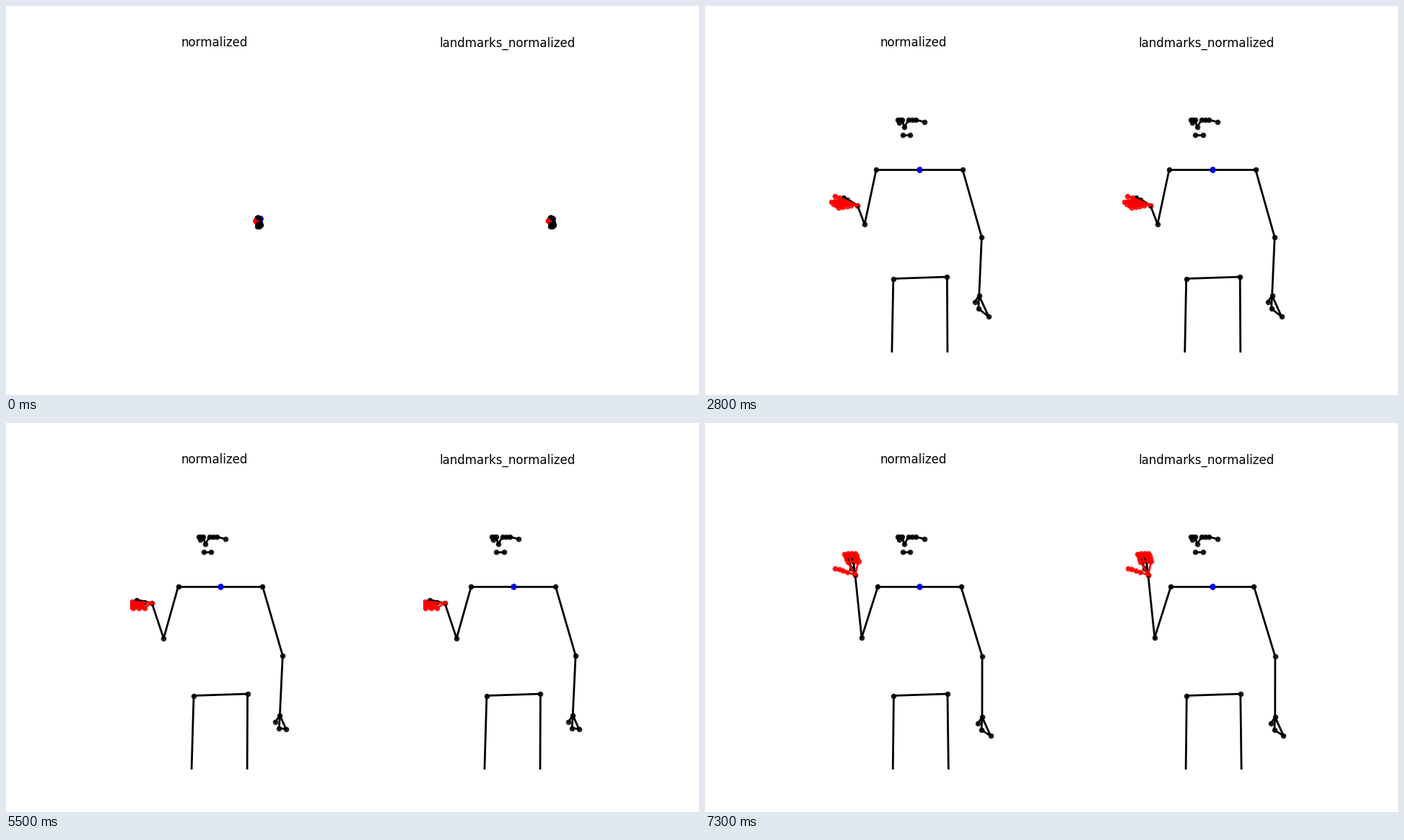
Animation of 960 by 540 pixels, one loop 8000 ms. Source, as a matplotlib script:

```python
import numpy as np
import matplotlib.pyplot as plt
from matplotlib.animation import FuncAnimation
from matplotlib.collections import LineCollection

STEP = 100
FRAMES = 80
CENTER = np.array([297, 227])

# Key values of the moving parts, times in seconds, angles in degrees above left
BEATS = [0.1, 1.0, 1.9, 3.7, 5.5, 6.8, 7.3]
TRACKS = {
    "wrist_x": [214, 218, 216, 206, 202, 206, 208],
    "wrist_y": [352, 312, 285, 268, 250, 220, 211],
    "aim": [-65, 43, 29, 15, 4, 36, 60],
    "curl": [-95, -110, -22, 0, 0, 0, 70],
    "reach": [15, 15, 11, 23, 24, 13, 12],
    "sway": [1, 1, -1.5, 0.5, -2.5, 0.5, 1],
    "splay": [20, 18, 30, 29, 19, 18, 26],
}

# 0-10 face, 11-12 shoulders, 13-14 elbows, 15-16 wrists, 17-19 left and
# 20-22 right pinky/index/thumb, 23-24 hips, 25-26 knees
BODY_LINKS = [(0, 1), (1, 2), (2, 3), (3, 7), (0, 4), (4, 5), (5, 6), (6, 8),
              (9, 10), (11, 12), (11, 13), (13, 15), (12, 14), (14, 16),
              (15, 17), (15, 18), (15, 19), (17, 18),
              (16, 20), (16, 21), (16, 22), (20, 21),
              (23, 24), (23, 25), (24, 26)]
HAND_LINKS = [(0, 1), (0, 5), (5, 9), (9, 13), (13, 17), (0, 17)]
HAND_LINKS += [(4 * f + j, 4 * f + j + 1) for f in range(5) for j in (1, 2, 3)]


def vec(x, y):
    return np.array([x, y], float)


def polar(length, degrees):
    a = np.radians(degrees)
    return -length * vec(np.cos(a), np.sin(a))


def face(t):
    turn = np.clip((1.9 - t) / 0.9, 0, 1)
    nose = vec(276, 168) + turn * vec(3, -1.5)
    left_eye = [(6 + 5 * i, -10) for i in range(3)]
    right_eye = [(-3 - 3 * i, -10) for i in range(3)]
    ears = [(28, -7), (-7, -6)]
    mouth = [(8, 11), (-2.5, 11)]
    return nose + np.array([(0, 0)] + left_eye + right_eye + ears + mouth)


def hand(t, k, wrist):
    opening = np.clip((t - 6.8) / 0.5, 0, 1)
    index = wrist + polar(21, k["aim"])
    palm = vec(10.5, 8) + opening * vec(4.5, -9)
    finger = polar(k["reach"], k["curl"])
    thumb = polar(34, k["aim"]) + opening * vec(-11, 20)
    joints = [wrist[None], np.linspace(wrist + 0.4 * thumb, wrist + thumb, 4)]
    for i in range(4):
        knuckle = index + palm * i / 3
        joints.append(np.linspace(knuckle, knuckle + finger, 4))
    return np.vstack(joints)


def pose(t):
    k = {name: np.interp(t, BEATS, track) for name, track in TRACKS.items()}
    half = vec(61.2 - 0.5 * t, 0)

    wrist = vec(k["wrist_x"], k["wrist_y"])
    elbow = vec(np.interp(t, [0.1, 1.9, 6.8], [211, 222, 217]),
                297.5 + 14 * np.exp((0.9 - t) / 2))
    joints = hand(t, k, wrist)
    index, pinky = joints[5], joints[17]
    right = [(index + pinky) / 2 - vec(0, 4), index - vec(0, 3),
             (wrist + index) / 2]

    left_wrist = vec(378.5 + 0.6 * t + k["sway"], 398 + 1.4 * t)
    left_elbow = vec(320, 120) + left_wrist * vec(1 / 6, 0.5)
    left = [left_wrist + d for d in (vec(0.45, 1) * k["splay"],
                                     vec(-1, 18), vec(-6, 9))]

    sway = vec(k["sway"], 0)
    hips = [vec(335.5, 376) + 0.4 * sway, vec(261, 378.5) + 0.4 * sway]
    knees = [vec(336.5, 500) + sway, vec(259, 500) + sway]

    body = [CENTER + half, CENTER - half, left_elbow, elbow, left_wrist, wrist,
            *left, *right, *hips, *knees]
    return np.vstack([face(t), body]), joints


def held(ms):
    """Time of the pose on screen: slow steps, with one fast stretch."""
    if ms >= 7300:
        return 7300
    if ms >= 6400:
        return ms
    return 100 + (ms - 100) // 900 * 900


def shrink(p):
    return vec(349, 294) + (p - vec(287, 157)) * 0.035


class Part:
    def __init__(self, ax, color, links):
        self.links = np.array(links)
        self.dots = ax.scatter([], [], s=20, color=color, alpha=0.8)
        self.lines = LineCollection([], colors=color, linewidths=2,
                                    capstyle="projecting")
        ax.add_collection(self.lines, autolim=False)

    def place(self, p):
        self.dots.set_offsets(p)
        segments = p[self.links]
        moved = np.ptp(segments, axis=1).any(axis=1)
        self.lines.set_segments(segments[moved])


class Panel:
    def __init__(self, ax, title):
        ax.set_title(title)
        ax.set_box_aspect(16 / 9)
        ax.set_xlim(172.1, 406)
        ax.set_ylim(480.6, 64.8)
        ax.axis("off")
        self.left = Part(ax, "blue", HAND_LINKS)
        self.body = Part(ax, "black", BODY_LINKS)
        self.right = Part(ax, "red", HAND_LINKS)
        self.mark = ax.scatter(*CENTER, s=20, color="blue", alpha=0.8, zorder=3)

    def place(self, body, left, right, mark):
        self.body.place(body)
        self.left.place(left)
        self.right.place(right)
        self.mark.set_visible(mark is not None)
        if mark:
            self.mark.set_color(mark)


fig, axes = plt.subplots(1, 2, figsize=(9.6, 5.4), dpi=100)
panels = [Panel(ax, name)
          for ax, name in zip(axes, ("normalized", "landmarks_normalized"))]


def draw(n):
    ms = n * STEP
    if ms == 0:
        body, joints = pose(1.9)
        left = np.tile([351.5, 294.5], (21, 1))
        for panel in panels:
            panel.place(shrink(body), left, shrink(joints), None)
        return
    body, joints = pose(held(ms) / 1000)
    empty = np.tile(CENTER, (21, 1))
    lost = ms == 6800
    panels[0].place(body, empty, joints, "blue")
    panels[1].place(body, empty, empty if lost else joints,
                    "red" if lost else "blue")


anim = FuncAnimation(fig, draw, frames=FRAMES, interval=STEP, repeat=True,
                     repeat_delay=0, init_func=lambda: draw(0))
plt.show()
```
